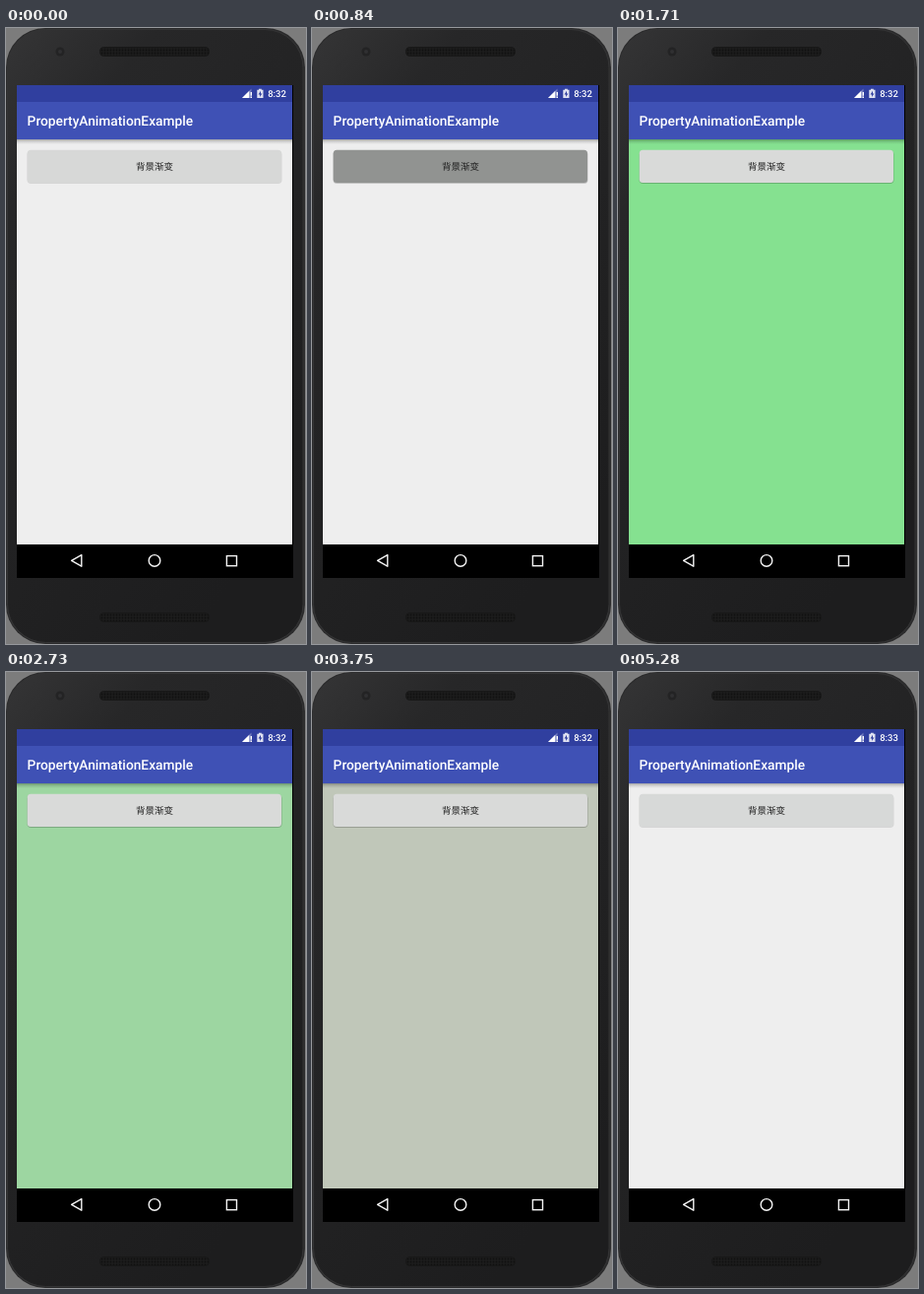
An HTML page for the animation above (6.09 s loop, 305x625 px).

```html
<!DOCTYPE html>
<html lang="zh">
<head>
<meta charset="utf-8">
<title>背景渐变</title>
<style>
html, body { margin: 0; width: 100%; height: 100%; overflow: hidden; background: #7c7c7c; }
svg { display: block; }
text { font-family: Roboto, "Noto Sans", sans-serif; font-weight: 500; fill: #fff; text-rendering: geometricPrecision; }
.label { font: 400 9.5px "Noto Sans CJK SC", "Noto Sans CJK", sans-serif; fill: #202020; }
</style>
</head>
<body>
<svg width="305" height="625" viewBox="0 0 305 625">
  <defs>
    <linearGradient id="body" x1="0" y1="0" x2=".6" y2="1">
      <stop offset="0" stop-color="#353536"/>
      <stop offset=".22" stop-color="#272728"/>
      <stop offset="1" stop-color="#1d1d1e"/>
    </linearGradient>
    <linearGradient id="drop" x1="0" y1="0" x2="0" y2="1">
      <stop offset="0" stop-color="#000" stop-opacity=".3"/>
      <stop offset=".45" stop-color="#000" stop-opacity=".12"/>
      <stop offset="1" stop-color="#000" stop-opacity="0"/>
    </linearGradient>
    <pattern id="mesh" width="3" height="3" patternUnits="userSpaceOnUse">
      <rect width="3" height="3" fill="#1b1b1b"/>
      <circle cx="1.5" cy="1.5" r=".9" fill="#101010"/>
    </pattern>
  </defs>

  <rect width="305" height="625" fill="#7c7c7c"/>
  <rect x="0" y="0" width="304" height="625" rx="40" fill="#2a2a2b"/>
  <rect x="1.5" y="1.5" width="300.5" height="622" rx="39" fill="url(#body)" stroke="#343435"/>

  <circle cx="55" cy="24" r="4.5" fill="#232324"/>
  <circle cx="55" cy="24" r="2" fill="#303032"/>
  <rect x="95.5" y="19.5" width="111" height="9" rx="4" fill="url(#mesh)" stroke="#181818"/>
  <rect x="95.5" y="593.5" width="111" height="9" rx="4" fill="url(#mesh)" stroke="#181818"/>

  <rect x="11" y="58" width="281" height="500"/>
  <rect id="page" x="11" y="113" width="280" height="411" fill="#eee"/>
  <rect x="11" y="113" width="280" height="5" fill="url(#drop)"/>
  <rect x="11" y="58" width="280" height="17" fill="#303f9f"/>
  <rect x="11" y="75" width="280" height="38" fill="#3f51b5"/>

  <g fill="#fff">
    <path d="M240 71 L249.5 61.5 V71Z" opacity=".3"/>
    <path d="M240 71 L247.3 63.7 V71Z"/>
    <path d="M248.6 65h1.4v3.8h-1.4zM248.6 69.6h1.4v1.4h-1.4z"/>
    <path d="M255.3 62.8h1.7v-1h2.8v1h1.7V71h-6.2z" opacity=".85"/>
    <path d="M259 63.8 L256.6 67.4 H258.1 V70 L260.4 66.4 H259Z" fill="#303f9f"/>
  </g>
  <text id="before" x="266.2" y="70.2" font-size="9.5">8:32</text>
  <text id="after" x="266.2" y="70.2" font-size="9.5" opacity="0">8:33</text>
  <text x="21.6" y="99.2" font-size="13.75">PropertyAnimationExample</text>

  <rect id="lift" x="21.5" y="124.5" width="259" height="33.5" rx="4" fill="#000" opacity=".1"/>
  <rect id="button" x="21.7" y="123.8" width="258.3" height="33.2" rx="3.5" fill="#d7d8d7"/>
  <text class="label" x="151" y="144" text-anchor="middle">背景渐变</text>

  <g fill="none" stroke="#f4f4f4" stroke-width="1.4" stroke-linejoin="round">
    <path d="M66.6 540.4 L76.8 534.6 V546.2Z"/>
    <circle cx="151" cy="540.4" r="5.8"/>
    <rect x="224.4" y="535.6" width="10.1" height="10.1" stroke-linejoin="miter"/>
  </g>
</svg>
<script>
const LOOP = 6090;
const HOLD = "steps(1, end)";

// Each step: [time in ms, value, easing to the next step]
function play(id, prop, steps) {
  const frames = steps.map(([time, value, easing = HOLD]) =>
    ({ offset: time / LOOP, [prop]: value, easing }));
  frames.push({ offset: 1, [prop]: steps[steps.length - 1][1] });
  document.getElementById(id).animate(frames, { duration: LOOP, iterations: Infinity });
}

// Two values at one time make a hard change.
play("page", "fill", [
  [0, "#eeeeee"],
  [870, "rgb(127,227,140)", "cubic-bezier(.4,0,.68,.36)"],
  [2730, "rgb(157,214,161)", "linear"],
  [3090, "rgb(169,207,171)", "cubic-bezier(.33,.34,.67,.74)"],
  [4710, "rgb(221,189,204)", "ease-out"],
  [5280, "rgb(229,185,210)"],
  [5280, "#eeeeee"]
]);

play("button", "fill", [
  [0, "#d7d8d7"],
  [810, "#b6b8b6"],
  [840, "#919391"],
  [870, "#d9dad9"],
  [5280, "#d7d9d8"]
]);

play("lift", "opacity", [[0, .1], [810, .18], [870, .2], [5280, .1]]);
play("before", "opacity", [[0, 1], [4290, 0]]);
play("after", "opacity", [[0, 0], [4290, 1]]);
</script>
</body>
</html>
```
